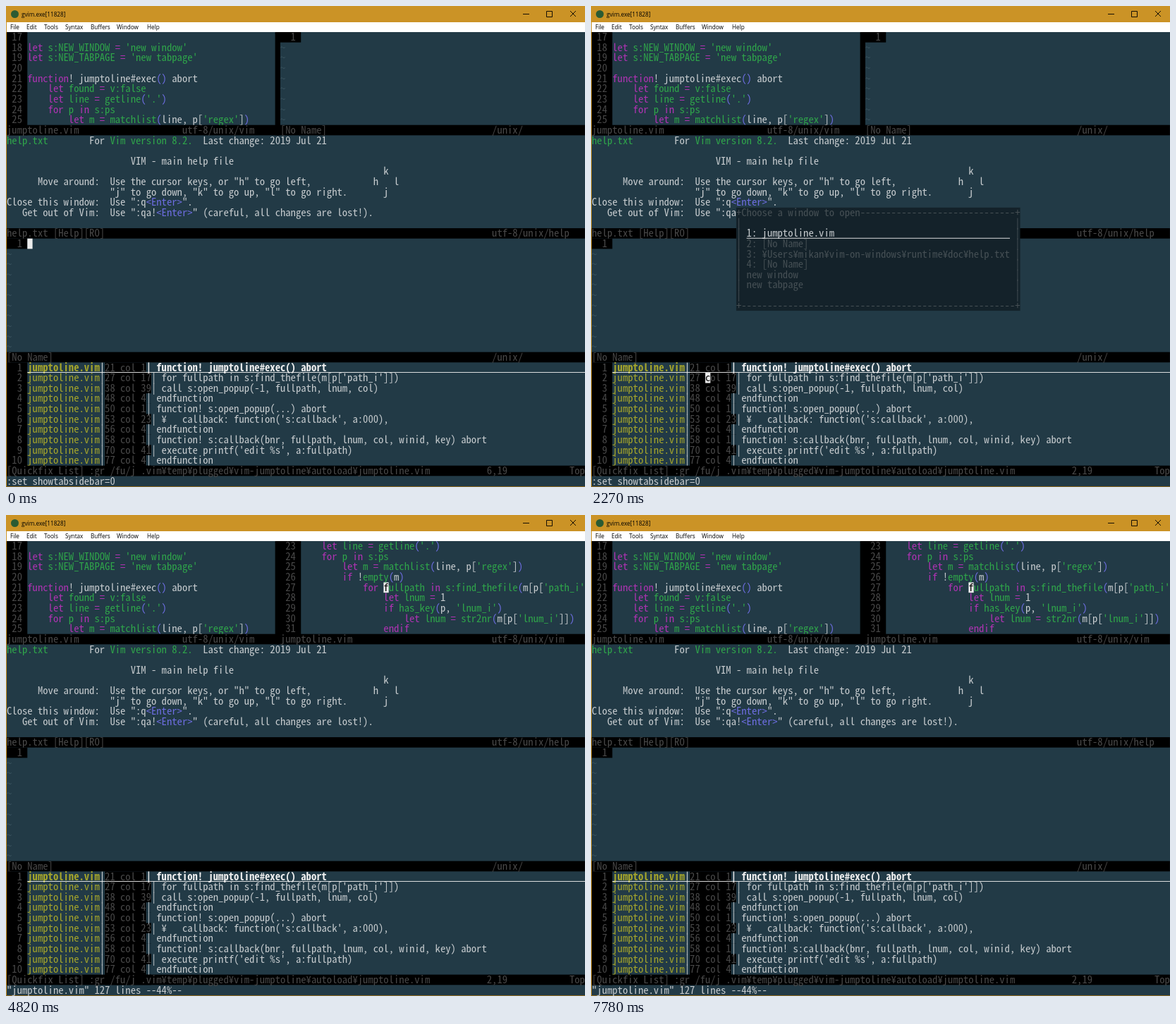
An HTML page with a canvas that plays this animation: 821 by 682 pixels, repeating every 8000 ms.

```html
<!DOCTYPE html>
<html lang="en">
<head>
<meta charset="utf-8">
<title>Editor window picker</title>
<style>
  html, body { margin: 0; width: 100%; height: 100%; overflow: hidden; background: #223a46; }
  canvas { display: block; }
</style>
</head>
<body>
<canvas id="stage" width="821" height="682"></canvas>
<script>
const ctx = document.getElementById('stage').getContext('2d');
const LOOP = 8000;
const LEFT = 1, TOP = 37, CELL_W = 7.32, CELL_H = 14.635, COLS = 112;
const MONO = '"Noto Sans Mono CJK JP", "Noto Sans Mono", "DejaVu Sans Mono", monospace';
const UI = '"Open Sans", "Noto Sans", sans-serif';
const C = {
  back: '#223a46', black: '#000', text: '#c6cbce', bright: '#f0f0f0', dim: '#484848',
  tilde: '#3a545f', keyword: '#ae33b2', green: '#2fa44a', special: '#6d6de0', file: '#a5a52b',
  popup: '#14222a', popupText: '#454f54', gold: '#cb9326', cursor: '#ececec'
};

// Font size whose advance equals one cell.
ctx.font = `100px ${MONO}`;
const fontSize = 100 * CELL_W / ctx.measureText('0').width;

const cellX = col => LEFT + col * CELL_W;
const cellY = row => TOP + row * CELL_H;
const passed = (times, t) => times.filter(time => t >= time).length;

function rect(x, y, w, h, color) {
  ctx.fillStyle = color;
  ctx.fillRect(x, y, w, h);
}

function fillCells(row, col, cols, rows, color) {
  rect(cellX(col), cellY(row), cols * CELL_W, rows * CELL_H, color);
}

function put(row, col, text, color = C.text, bold = false) {
  ctx.font = `${bold ? 'bold' : '300'} ${fontSize}px ${MONO}`;
  ctx.fillStyle = color;
  [...text].forEach((char, i) => {
    if (char !== ' ') ctx.fillText(char, cellX(col + i), cellY(row) + 12.2);
  });
}

// Parts are text, color, text, color, ...
function putParts(row, col, ...parts) {
  for (let i = 0; i < parts.length; i += 2) {
    put(row, col, parts[i], parts[i + 1]);
    col += parts[i].length;
  }
}

function lineNumber(row, col, number) {
  put(row, col, String(number).padStart(3), C.dim);
}

function underline(row, col, endX) {
  const x = cellX(col);
  rect(x, cellY(row + 1) - 0.9, endX - x, 0.9, C.bright);
}

function tildes(row, col, count) {
  for (let i = 0; i < count; i++) put(row + i, col, '~', C.tilde);
}

function status(row, col, cols, name, format, formatCol) {
  fillCells(row, col, cols, 1, C.black);
  put(row, col, name, C.dim);
  put(row, formatCol, format, C.dim);
}

const TOKEN = /('[^']*')|(\b(?:let|function|for|in|if|endif)\b|=)|([sv]:\w+|(?<=let |for )\w+|\b(?<!#)\w+(?=\())|([()])|./g;

function putCode(row, col, line) {
  for (const m of line.matchAll(TOKEN)) {
    const color = m[1] || m[3] ? C.green : m[2] ? C.keyword : m[4] ? C.special : C.text;
    put(row, col + m.index, m[0], color);
  }
}

function codeWindow(col, firstLine, lines) {
  fillCells(0, col, 4, lines.length + 1, C.black);
  lines.forEach((line, row) => {
    lineNumber(row, col, firstLine + row);
    putCode(row, col + 4, line);
  });
}

function emptyWindow(row, col, rows) {
  fillCells(row, col, 4, 1, C.black);
  lineNumber(row, col, 1);
  tildes(row + 1, col, rows - 1);
}

const LEFT_CODE = [
  '',
  "let s:NEW_WINDOW = 'new window'",
  "let s:NEW_TABPAGE = 'new tabpage'",
  '',
  'function! jumptoline#exec() abort',
  '    let found = v:false',
  "    let line = getline('.')",
  '    for p in s:ps',
  "        let m = matchlist(line, p['regex'])"
];
const RIGHT_CODE = [
  ...LEFT_CODE.slice(6),
  '        if !empty(m)',
  "            for fullpath in s:find_thefile(m[p['path_i'",
  '                let lnum = 1',
  "                if has_key(p, 'lnum_i')",
  "                    let lnum = str2nr(m[p['lnum_i']])",
  '                endif'
];
const QUICKFIX = [
  ['21 col 1', 'function! jumptoline#exec() abort'],
  ['27 col 17', "for fullpath in s:find_thefile(m[p['path_i']])"],
  ['38 col 39', 'call s:open_popup(-1, fullpath, lnum, col)'],
  ['48 col 4', 'endfunction'],
  ['50 col 1', 'function! s:open_popup(...) abort'],
  ['53 col 23', "¥   callback: function('s:callback', a:000),"],
  ['56 col 4', 'endfunction'],
  ['58 col 1', 'function! s:callback(bnr, fullpath, lnum, col, winid, key) abort'],
  ['70 col 41', "execute printf('edit %s', a:fullpath)"],
  ['77 col 4', 'endfunction']
];
const CHOICES = [
  '1: jumptoline.vim',
  '2: [No Name]',
  '3: ¥Users¥mikan¥vim-on-windows¥runtime¥doc¥help.txt',
  '4: [No Name]',
  'new window',
  'new tabpage'
];
const MENUS = { File: 6, Edit: 29, Tools: 54, Syntax: 84, Buffers: 120, Window: 157, Help: 200 };

function drawFrame() {
  rect(0, 0, 821, 682, C.back);
  rect(0, 0, 821, 23, C.gold);
  rect(0, 23, 821, 14, '#fff');
  rect(0, 23, 1, 659, C.gold);
  rect(0, 681, 821, 1, '#8f6a20');

  ctx.fillStyle = '#2b5b33';
  ctx.beginPath();
  ctx.arc(12.5, 11.5, 5.5, 0, 7);
  ctx.fill();

  ctx.fillStyle = '#000';
  ctx.font = `8.2px ${UI}`;
  ctx.fillText('gvim.exe[11828]', 22, 14.5);
  for (const [name, x] of Object.entries(MENUS)) ctx.fillText(name, x, 33);

  ctx.strokeStyle = '#000';
  ctx.lineWidth = 0.9;
  ctx.beginPath();
  ctx.moveTo(733, 11.5); ctx.lineTo(742, 11.5);
  ctx.rect(766.5, 7.5, 8, 8);
  ctx.moveTo(800, 7); ctx.lineTo(808, 15);
  ctx.moveTo(808, 7); ctx.lineTo(800, 15);
  ctx.stroke();
}

function drawTopWindows(opened) {
  codeWindow(0, 17, LEFT_CODE);
  fillCells(0, 52, 1, 10, C.black);
  if (opened) codeWindow(53, 23, RIGHT_CODE);
  else emptyWindow(0, 53, 9);
  status(9, 0, 53, 'jumptoline.vim', 'utf-8/unix/vim', 34);
  if (opened) status(9, 53, 59, 'jumptoline.vim', 'utf-8/unix/vim', 94);
  else status(9, 53, 59, '[No Name]', '/unix/', 94);
}

function drawHelp() {
  putParts(10, 0, 'help.txt', C.green, '        For ', C.text, 'Vim version 8.2.', C.green,
    '  Last change: 2019 Jul 21', C.text);
  put(12, 24, 'VIM - main help file');
  put(13, 73, 'k');
  put(14, 6, 'Move around:  Use the cursor keys, or "h" to go left,');
  put(14, 71, 'h   l');
  put(15, 20, '"j" to go down, "k" to go up, "l" to go right.');
  put(15, 73, 'j');
  putParts(16, 0, 'Close this window:  Use ":q', C.text, '<Enter>', C.special, '".', C.text);
  putParts(17, 3, 'Get out of Vim:  Use ":qa!', C.text, '<Enter>', C.special,
    '" (careful, all changes are lost!).', C.text);
  status(19, 0, COLS, 'help.txt [Help][RO]', 'utf-8/unix/help', 94);
}

function drawMiddleWindow() {
  emptyWindow(20, 0, 11);
  status(31, 0, COLS, '[No Name]', '/unix/', 94);
}

function drawQuickfix(line) {
  fillCells(32, 0, 4, 11, C.black);
  fillCells(32, 19, 9, 11, C.black);
  QUICKFIX.forEach(([place, text], i) => {
    const row = 32 + i, current = i === 0, end = 19 + place.length;
    const color = current ? C.bright : C.text;
    fillCells(row, end, 28 - end, 1, C.back);
    lineNumber(row, 0, i + 1);
    put(row, 4, 'jumptoline.vim', C.file, current);
    put(row, 18, '|', color);
    put(row, 19, place, C.dim);
    put(row, end, '| ' + text, color, current);
  });
  underline(32, 4, 821);
  status(42, 0, COLS,
    '[Quickfix List] :gr /fu/j .vim¥temp¥plugged¥vim-jumptoline¥autoload¥jumptoline.vim',
    `${line},19`, 93);
  put(42, 109, 'Top', C.dim);
}

function drawPopup(selected) {
  const border = text => '+' + text.padEnd(53, '-') + '+';
  fillCells(17, 28, 55, 10, C.popup);
  put(17, 28, border('Choose a window to open'), C.popupText);
  put(26, 28, border(''), C.popupText);
  for (let row = 18; row < 26; row++) {
    put(row, 28, '|', C.popupText);
    put(row, 82, '|', C.popupText);
  }
  CHOICES.forEach((choice, i) => {
    put(19 + i, 30, choice, i === selected ? C.text : C.popupText);
  });
  underline(19 + selected, 30, 594);
}

function drawCursor(row, col, char) {
  fillCells(row, col, 1, 1, C.cursor);
  put(row, col, char, C.black);
}

const MOVES = [570, 870, 990, 1140];
const BLINKS = [1850, 2120, 2960, 3250, 3680, 3800, 5530, 5780, 6220, 6370, 6820, 7100, 7500, 7780];
let shownState = '';

function render(t) {
  const line = 6 - passed(MOVES, t);
  const cursorOn = passed(BLINKS, t) % 2 === 0;
  const opened = t >= 4820;
  const popup = t >= 2270 && !opened;
  const selected = t >= 4080 ? 1 : 0;
  const message = t >= 4700;
  const started = t >= 150;

  const state = [line, cursorOn, opened, popup, selected, message, started].join();
  if (state === shownState) return;
  shownState = state;

  drawFrame();
  drawTopWindows(opened);
  drawHelp();
  drawMiddleWindow();
  drawQuickfix(line);
  put(43, 0, message ? '"jumptoline.vim" 127 lines --44%--' : ':set showtabsidebar=0');
  if (popup) drawPopup(selected);
  if (cursorOn) {
    if (opened) drawCursor(4, 73, 'f');
    else if (started) drawCursor(31 + line, 22, 'c');
    else drawCursor(20, 4, ' ');
  }
}

const start = performance.now();
function tick() {
  render((performance.now() - start) % LOOP);
  requestAnimationFrame(tick);
}
tick();
</script>
</body>
</html>
```
